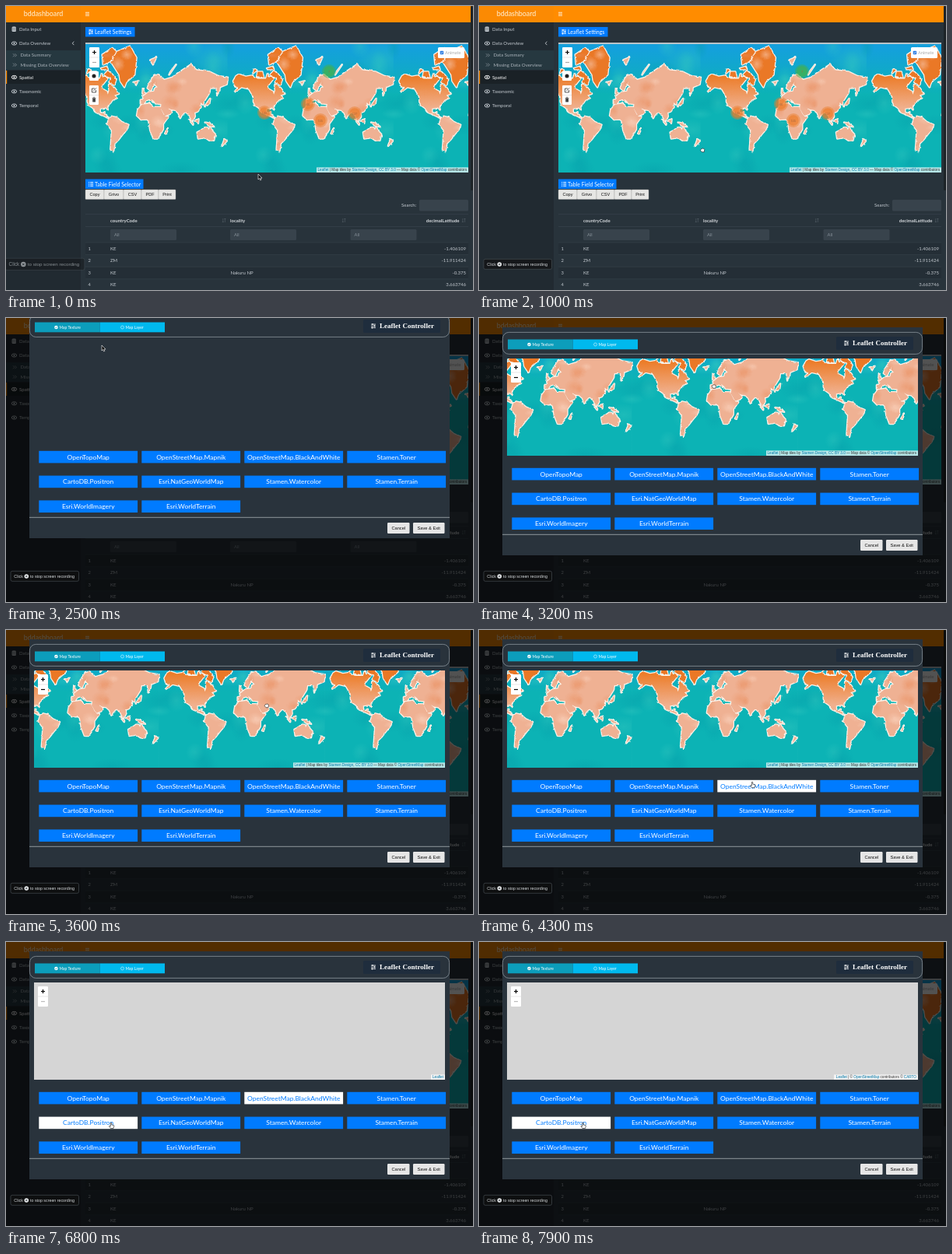
Animation of 600 by 365 pixels, one loop 8 s. Source, as an HTML page:

```html
<!DOCTYPE html>
<html lang="en">
<head>
<meta charset="utf-8">
<title>Map dashboard</title>
<style>
  html, body { margin: 0; width: 100%; height: 100%; overflow: hidden; background: #28333b; }
  svg { display: block; width: 600px; height: 365px; font-family: Lato, "Open Sans", sans-serif; }
  .ui { font-family: "Liberation Sans", sans-serif; }
  .link { fill: #0078a8; }
</style>
</head>
<body>
<svg id="stage" viewBox="0 0 600 365" xmlns="http://www.w3.org/2000/svg"></svg>
<script>
const LOOP = 8000, STEP = 100;
const WORLD = 213.3, DEG = WORLD / 360, RADIUS = WORLD / (2 * Math.PI);
const BLUE = '#007bff', ORANGE = '#ff8c00', PALE = '#c4cad0';

// ---------- drawing helpers ----------
const rect = (x, y, w, h, fill, more = '') =>
  `<rect x="${x}" y="${y}" width="${w}" height="${h}" fill="${fill}" ${more}/>`;
const circle = (x, y, r, fill, more = '') =>
  `<circle cx="${x}" cy="${y}" r="${r}" fill="${fill}" ${more}/>`;
const line = (d, color, width = 0.8) =>
  `<path d="${d}" fill="none" stroke="${color}" stroke-width="${width}"/>`;
const text = (x, y, s, size, fill, more = '') =>
  `<text x="${x}" y="${y}" font-size="${size}" fill="${fill}" ${more}>${s}</text>`;
const MID = 'text-anchor="middle"', END = 'text-anchor="end"', UI = 'class="ui"', BOLD = 'font-weight="bold"';

const listIcon = (x, y, color) =>
  line(`M${x} ${y - 2.2}h1.2m1 0h4M${x} ${y}h1.2m1 0h4M${x} ${y + 2.2}h1.2m1 0h4`, color, 1.1);
const sliderIcon = (x, y, color) =>
  line(`M${x} ${y - 2.2}h6M${x} ${y}h6M${x} ${y + 2.2}h6`, color, 0.8) +
  line(`M${x + 2} ${y - 3.2}v2M${x + 4.5} ${y - 1}v2M${x + 1.5} ${y + 1.2}v2`, color, 1.1);
const eyeIcon = (x, y, color) =>
  `<ellipse cx="${x}" cy="${y}" rx="3.2" ry="2.1" fill="none" stroke="${color}"/>` + circle(x, y, 1.1, color);

// ---------- world map ----------
const COASTS = {
  northAmerica: '-168 66,-162 70,-156 71.3,-141 69.6,-128 70.3,-115 68,-97 68,-94 71.5,-91 69,-85 69.5,-81 68,-87 65,-94 61,-94 58.5,-82 55,-80 51,-77 56,-78 62.5,-70 61,-65 59,-56 52,-66 50,-60 46,-70 43,-76 36,-81 31,-80 25.5,-83 30,-97 28,-97 20,-91 18.5,-87 21,-88 16,-83 15,-83 10,-78 8.5,-86 12,-95 16,-105 20,-112 29,-120 34,-124 40,-124 48,-134 58,-150 60,-158 57,-165 54.5,-158 59,-165 62',
  ellesmere: '-90 77,-92 81,-70 83,-62 82,-75 78.5',
  devon: '-95 75,-82 76,-80 74.5,-92 74.5',
  victoria: '-117 70,-115 73,-105 73,-102 69',
  banks: '-125 72,-122 74.5,-117 74',
  baffin: '-88 71,-80 73.5,-70 71,-62 67,-66 62.5,-77 65,-72 68',
  greenland: '-72 78,-60 82,-32 83.5,-18 80,-22 71,-40 65,-44 60,-53 66,-55 71',
  southAmerica: '-77 8,-72 12,-60 9,-50 0,-35 -6,-39 -16,-48 -26,-57 -36,-65 -42,-68 -54,-74 -51,-72 -30,-71 -18,-81 -5',
  africa: '-6 35,10 37,20 31,33 31,43 12,51 11,40 -4,40 -16,33 -27,27 -34,19 -34,12 -18,9 2,5 6,-8 5,-17 14,-15 25',
  eurasia: '-9 37,-9 43,-2 44,-4 48,8 54,20 55,23 59,28 60,22 63,24 66,18 61,13 56,6 59,10 64,20 70,30 71,42 67,60 69,72 72,100 77,112 74,140 73,160 70,180 69,178 63,163 60,162 56,157 51,156 59,142 59,140 53,128 40,127 35,121 39,122 31,115 22,108 20,109 12,104 2,99 9,94 17,88 22,80 14,77 8,73 19,66 25,57 26,50 30,58 23,55 17,44 13,35 28,36 36,27 37,24 37,20 41,13 45,17 40,9 44,3 42,-2 37',
  australia: '114 -22,122 -18,131 -12,136 -12,139 -17,142 -11,146 -19,153 -26,150 -37,140 -37,131 -32,116 -34',
  madagascar: '44 -24,50 -15,47 -25',
  newZealand: '173 -35,178 -38,168 -46',
  borneo: '109 2,117 6,116 -3',
  sumatra: '96 5,105 -3,105 -6',
  newGuinea: '131 -1,141 -3,150 -10,139 -8',
  japan: '130 32,140 36,142 45',
  britain: '-5 50,1 52,-4 58',
  iceland: '-23 65,-15 66,-18 63',
  svalbard: '12 79,25 80,18 77',
  novaya: '53 71,68 77,56 73'
};
const coastPath = coast => 'M' + coast.split(',').map(point => {
  const [lon, lat] = point.split(' ').map(Number);
  const y = -RADIUS * Math.asinh(Math.tan(lat * Math.PI / 180));
  return (lon * DEG).toFixed(1) + ' ' + y.toFixed(1);
}).join('L') + 'Z';

let seed = 11;
const random = () => (seed = seed * 16807 % 2147483647) / 2147483647;
const washes = (count, size, names) => Array.from({ length: count }, () => {
  const x = (random() - 0.5) * WORLD, y = (random() - 0.5) * 200;
  const rx = size * (0.4 + random()), ry = size * (0.3 + random() * 0.7);
  return `<ellipse cx="${x}" cy="${y}" rx="${rx}" ry="${ry}" fill="url(#${names[random() * names.length | 0]})"/>`;
}).join('');
const wash = (id, color, opacity) => `<radialGradient id="${id}"><stop stop-color="${color}" stop-opacity="${opacity}"/>
  <stop offset="1" stop-color="${color}" stop-opacity="0"/></radialGradient>`;
const ramp = (id, y1, y2, from, to) => `<linearGradient id="${id}" gradientUnits="userSpaceOnUse"
  x1="0" x2="0" y1="${y1}" y2="${y2}"><stop stop-color="${from}"/><stop offset="1" stop-color="${to}"/></linearGradient>`;

const ARCTIC = '#ea7828';
const landFill = { northAmerica: 'url(#americaFill)', greenland: ARCTIC, ellesmere: ARCTIC, devon: ARCTIC,
  victoria: ARCTIC, banks: ARCTIC, baffin: ARCTIC };
const coastPaths = Object.entries(COASTS).map(([name, coast]) => [name, coastPath(coast)]);
const allLand = coastPaths.map(([, d]) => d).join('');

const defs = `<defs>
  ${wash('deep', '#069faa', 0.4)}${wash('light', '#35c8c0', 0.4)}
  ${wash('rose', '#f9d0ba', 0.55)}${wash('rust', '#e98a58', 0.45)}
  ${ramp('seaFill', -95, -35, '#14a0dc', '#0cb3b5')}${ramp('americaFill', -58, -18, '#ec7d2a', '#f0b08e')}
  <filter id="rough"><feTurbulence type="fractalNoise" baseFrequency=".22" numOctaves="2" seed="3"/>
    <feDisplacementMap in="SourceGraphic" scale="2.6" xChannelSelector="R" yChannelSelector="G"/></filter>
  <clipPath id="landClip"><path d="${allLand}"/></clipPath>
  <clipPath id="pageMapClip"><rect x="102" y="49" width="492" height="165"/></clipPath>
  <clipPath id="modalMapClip"><rect x="36" y="52" width="528" height="125"/></clipPath>
  <g id="sea">${rect(-WORLD / 2 - 0.3, -110, WORLD + 0.6, 220, 'url(#seaFill)')}
    ${washes(30, 22, ['deep', 'light'])}</g>
  <g id="land" filter="url(#rough)"><path d="${allLand}" fill="none" stroke="#fbf1e8" stroke-width="2.6" stroke-linejoin="round"/>
    ${coastPaths.map(([name, d]) => `<path d="${d}" fill="${landFill[name] || '#efb193'}"/>`).join('')}
    <g clip-path="url(#landClip)">${washes(70, 11, ['rose', 'rust'])}</g></g>
</defs>`;

const worldMap = (x0, y0, clip) => `<g clip-path="url(#${clip})">` + ['sea', 'land'].map(id =>
  [-2, -1, 0, 1, 2].map(k => `<use href="#${id}" x="${x0 + k * WORLD}" y="${y0}"/>`).join('')).join('') + '</g>';

const zoomControl = (x, y, id, minusColor) =>
  rect(x, y, 13, 26, '#fff', 'rx="1.2"') + line(`M${x} ${y + 13}h13`, '#ccc', 0.5) +
  line(`M${x + 4} ${y + 6.5}h5m-2.5 -2.5v5`, '#000', 1.2) +
  `<path id="${id}" d="M${x + 4} ${y + 19.5}h5" stroke="${minusColor}" stroke-width="1.2"/>`;

const link = s => `<tspan class="link">${s}</tspan>`;
const OSM = link('OpenStreetMap');
const CREDITS = {
  tiles: `${link('Leaflet')} | Map tiles by ${link('Stamen Design')}, ${link('CC BY 3.0')} — Map data © ${OSM} contributors`,
  none: link('Leaflet'),
  carto: `${link('Leaflet')} | © ${OSM} contributors © ${link('CARTO')}`
};
const credit = (kind, right, bottom, width) =>
  rect(right - width, bottom - 6.6, width, 6.6, '#fff', 'fill-opacity=".7"') +
  text(right - 2, bottom - 1.7, CREDITS[kind], 4.67, '#333', `${UI} ${END}`);

// ---------- page ----------
function sidebar() {
  const item = (y, label, color = PALE) => eyeIcon(10.5, y, color) + text(17, y + 2.1, label, 6.1, color);
  const subItem = (y, label) =>
    line(`M9 ${y - 2}l2 2l-2 2m2.5 -4l2 2l-2 2`, '#a9b1b8', 0.6) + text(18.5, y + 2.1, label, 6.1, '#a9b1b8');
  return rect(0, 20, 96, 345, '#212a31') + rect(0, 57, 96, 25, '#263840') +
    rect(0, 83, 96, 17, '#1a2126') + rect(0, 83, 1.2, 17, ORANGE) +
    rect(7.5, 26.5, 5.5, 6.4, PALE, 'rx="1.5"') + line('M7.5 28.7h5.5m-5.5 2.1h5.5', '#212a31', 0.5) +
    text(17, 31.8, 'Data Input', 6.1, PALE) + item(48, 'Data Overview') +
    line('M87.3 45.7l-2 2.2l2 2.2', PALE, 0.9) +
    subItem(63.3, 'Data Summary') + subItem(75.6, 'Missing Data Overview') +
    item(91.5, 'Spatial', '#fff') + item(109.8, 'Taxonomic') + item(128, 'Temporal');
}

function pageMap() {
  const marker = (x, y, color, count) => circle(x, y, 9, color, 'fill-opacity=".45"') +
    circle(x, y, 6.8, color, 'fill-opacity=".6"') + text(x, y + 1.5, count, 4, '#a8663a', `${UI} ${MID}`);
  const tool = (y, h) => rect(107, y, 12, h, '#fff', 'rx="1.2"');
  return rect(102, 47, 492, 2, '#b9c3c8') + worldMap(391.5, 149, 'pageMapClip') +
    marker(332, 137, '#ec7c28', '142') + marker(388, 126, '#ec7c28', '86') + marker(404, 147, '#ec7c28', '515') +
    marker(448, 138, '#ec7c28', '127') + marker(415, 84, '#45b04a', '7') +
    zoomControl(107, 53, 'pageMinus', '#aaa') + tool(84, 12) + circle(113, 90, 2.5, '#222') +
    tool(102, 25) + line('M107 114.5h12', '#ccc', 0.5) +
    line('M114 106h-3.5v5h5v-3m-3 1l3.5 -3.7', '#333', 0.8) +
    line('M110.8 118.3h4.6m-3.1 -1h1.6', '#333', 0.8) + rect(111.2, 119, 3.8, 4.4, '#444') +
    rect(555, 53, 34, 14, '#fff', 'rx="1.5"') + rect(557.7, 57.7, 4.5, 4.5, '#2f7de1', 'rx=".8"') +
    line('M558.8 60l.9 1l1.5 -2.1', '#fff', 0.6) + text(564, 61.7, 'Animate', 5.6, '#aaa') +
    credit('tiles', 594, 214, 195);
}

function table() {
  const columns = [[134, 'countryCode', 280], [288, 'locality', 434]];
  const rows = [['KE', '', '-1.406109'], ['ZM', '', '-11.911424'], ['KE', 'Nakuru NP', '-0.375'], ['KE', '', '3.663746']];
  const sort = x => line(`M${x - 1.2} 273v5m-1 -1l1 1l1 -1M${x + 1.4} 278v-5m-1 1l1 -1l1 1`, '#5d6871', 0.5);
  const labels = [['Copy', 102, 24], ['Grivo', 126, 25], ['CSV', 151, 23], ['PDF', 174, 22], ['Print', 196, 22]];
  return labels.map(([s, x, w]) => rect(x, 236, w, 12.5, '#e6e6e4', 'stroke="#999" stroke-width=".4" rx=".8"') +
      text(x + w / 2, 244.2, s, 5.6, '#111', `${UI} ${MID}`)).join('') +
    text(508, 258.2, 'Search:', 6, PALE) + rect(531, 249, 63, 14.5, '#38434c', 'rx="1.5"') +
    line('M102 267.7h492M102 283.5h492', '#3b464f', 0.6) +
    columns.map(([x, s, arrow]) => text(x, 277.6, s, 6, '#d4d8dc', BOLD) + sort(arrow)).join('') +
    text(582.5, 277.6, 'decimalLatitude', 6, '#d4d8dc', `${BOLD} ${END}`) + sort(588) +
    [134, 288, 442.5].map(x => rect(x, 287, 85, 14, '#38434c', 'rx="1.5"') + text(x + 5, 296.2, 'All', 5.8, '#87929a')).join('') +
    rows.map(([code, place, lat], i) => {
      const y = 304 + i * 15.6;
      return (i % 2 ? '' : rect(102, y, 492, 15.6, '#242e36')) + line(`M102 ${y}h492`, '#3b464f', 0.5) +
        text(105.5, y + 9.6, i + 1, 5.8, PALE) + text(134, y + 9.6, code, 6, PALE) +
        text(288.5, y + 9.6, place, 6, PALE) + text(591, y + 9.6, lat, 6, PALE, END);
    }).join('');
}

const page = rect(0, 0, 600, 365, '#28333b') + sidebar() +
  rect(0, 0, 600, 21, ORANGE) + rect(0, 0, 96, 21, '#fb8a03') +
  text(48, 13.3, 'bddashboard', 8.9, '#fff3dc', MID) +
  line('M102 8.3h5m-5 2h5m-5 2h5', '#fff', 0.8) +
  `<g id="settings" color="#fff">${rect(102, 27, 63.5, 12.5, BLUE, 'id="settingsBox"')}
    ${sliderIcon(106, 33.2, 'currentColor')}${text(114, 35.8, 'Leaflet Settings', 7.05, 'currentColor')}</g>` +
  pageMap() + rect(102, 222.5, 74.5, 12.5, BLUE) + listIcon(106, 229, '#fff') +
  text(114, 231.5, 'Table Field Selector', 6.95, '#fff') + table() +
  rect(597, 0, 3, 237, '#1d2327', 'rx="1"');

// ---------- dialog ----------
const PROVIDERS = ['OpenTopoMap', 'OpenStreetMap.Mapnik', 'OpenStreetMap.BlackAndWhite', 'Stamen.Toner',
  'CartoDB.Positron', 'Esri.NatGeoWorldMap', 'Stamen.Watercolor', 'Stamen.Terrain',
  'Esri.WorldImagery', 'Esri.WorldTerrain'];
const BLACK_AND_WHITE = 2, POSITRON = 4;
const providerBox = i => ({ x: 42.3 + i % 4 * 132, y: 192.8 + (i >> 2) * 31.8, w: 126.8, h: 15.6 });
const providers = PROVIDERS.map((name, i) => {
  const { x, y, w, h } = providerBox(i);
  return `<g class="provider" color="#fff">${rect(x, y, w, h, BLUE)}
    ${text(x + w / 2, y + 10.7, name, 8.46, 'currentColor', MID)}</g>`;
}).join('');
const footButton = (x, w, s) => rect(x, 285, w, 14, '#e6e6e6', 'rx="1.2"') +
  text(x + w / 2, 294, s, 5.7, '#111', `${UI} ${MID}`);

const dialog = rect(30, 12, 540, 293, '#29333c') +
  rect(30.4, 18.4, 539.2, 28, 'none', 'rx="8" stroke="#8b959c" stroke-width=".8"') +
  rect(37, 27.5, 83.5, 12.8, '#0c9dbb') + rect(120.5, 27.5, 83.5, 12.8, '#00b9ee') +
  circle(64.5, 34, 2.3, '#fff') + line('M63.3 34l.9 1l1.6 -2', '#0c9dbb', 0.6) +
  text(68.5, 35.8, 'Map Texture', 5, '#fff') +
  circle(149.5, 34, 2, 'none', 'stroke="#fff" stroke-width=".5"') + text(153.5, 35.8, 'Map Layer', 5, '#fff') +
  rect(459, 24, 99, 17, '#1f2d3d', 'rx="1.5"') + sliderIcon(469, 32.3, '#fff') +
  text(480, 35.4, 'Leaflet Controller', 9.05, '#fff', `${BOLD} font-family="Liberation Serif, serif"`) +
  `<g id="preview">${rect(36, 52, 528, 125, '#d5d5d5')}
    <g id="tiles">${worldMap(303, 114.5, 'modalMapClip')}</g>${zoomControl(41, 57, 'minus', '#000')}
    <g id="creditTiles">${credit('tiles', 564, 177, 195)}</g>
    <g id="creditNone">${credit('none', 564, 177, 18)}</g>
    <g id="creditCarto">${credit('carto', 564, 177, 108)}</g></g>` +
  providers + line('M30 278.3h540', '#a9b0b5', 0.8) +
  footButton(490, 28.5, 'Cancel') + footButton(523, 40.5, 'Save &amp; Exit');

// ---------- overlay ----------
const toast = rect(6, 325.3, 87.5, 13, '#111', 'fill-opacity=".7" rx="2" stroke="#4d565c" stroke-width=".6"') +
  text(10.3, 333.9, 'Click', 5.4, '#d8dcdf', UI) + circle(26.3, 332, 2.8, '#e8eaec') +
  line('M25.2 330.9l2.2 2.2m0 -2.2l-2.2 2.2', '#171d21', 0.7) +
  text(31, 333.9, 'to stop screen recording', 5.3, '#d8dcdf', UI);
const outline = 'stroke-width=".6" stroke-linejoin="round"';
const cursors =
  `<path id="arrow" d="M0 0V7L1.6 5.6L2.7 8L3.9 7.4L2.8 5.1H5Z" fill="#111" stroke="#fff" ${outline}/>
   <path id="hand" d="M-.7 .4Q0 -.5 .7 .4V3L3.6 3.6Q4 4.5 3.5 6L3 7.5H-.6L-2.6 4.7Q-2.2 3.8 -.7 5Z" fill="#fff" stroke="#111" ${outline}/>
   <path id="grab" d="M-2 1Q-1.4 -.2 -.6 .5Q.4 -.5 1 .5Q2 0 2.4 1.4L2 4.7H-1L-2.8 2.6Z" fill="#fff" stroke="#111" ${outline}/>`;

const stage = document.getElementById('stage');
stage.innerHTML = defs + page + rect(0, 0, 600, 365, '#000', 'id="dim"') + `<g id="dialog">${dialog}</g>
  <g id="toast">${toast}</g><g id="cursor">${cursors}</g>`;

// ---------- motion ----------
const $ = id => document.getElementById(id);
const show = (id, on) => $(id).style.display = on ? '' : 'none';
const clamp = v => Math.max(0, Math.min(1, v));
const inside = (p, b) => p.x >= b.x && p.x <= b.x + b.w && p.y >= b.y && p.y <= b.y + b.h;
const providerNodes = [...document.querySelectorAll('.provider')];
const SETTINGS = { x: 102, y: 27, w: 64, h: 13 };
const PAGE_MAP = { x: 102, y: 49, w: 492, h: 165 };
const PREVIEW = { x: 36, y: 52, w: 528, h: 125 };
const OPEN = 2500, PREVIEW_SHOWN = 2700, TILES_SHOWN = 2900, FIRST_PICK = 4600, SECOND_PICK = 7400;

// time, x, y of the pointer tip
const PATH = [[0, 324, 216], [700, 324, 216], [1800, 123, 35], [2600, 123, 35], [3400, 335, 95], [3700, 335, 95],
  [4400, 352, 201], [5500, 352, 201], [6500, 135, 232], [7400, 135, 232], [7700, 133.5, 232], [LOOP, 133.5, 232]];
function pointerAt(t) {
  const i = PATH.findIndex(p => p[0] > t);
  const [t0, x0, y0] = PATH[i - 1], [t1, x1, y1] = PATH[i];
  const u = (t - t0) / (t1 - t0), e = u * u * (3 - 2 * u);
  return { x: x0 + (x1 - x0) * e, y: y0 + (y1 - y0) * e };
}
function paintButton(box, group, lit) {
  box.setAttribute('fill', lit ? '#fff' : BLUE);
  group.setAttribute('color', lit ? BLUE : '#fff');
}

function render(t) {
  const pointer = pointerAt(t), open = t >= OPEN;
  const settled = clamp((t - 100) / 400), scale = 1.17 - 0.17 * settled;
  $('toast').setAttribute('transform', `translate(49.7 331.8) scale(${scale}) translate(-49.7 -331.8)`);
  $('toast').setAttribute('opacity', 0.55 + 0.45 * settled);

  const onSettings = !open && inside(pointer, SETTINGS);
  paintButton($('settingsBox'), $('settings'), onSettings);

  $('dim').setAttribute('opacity', 0.68 * clamp((t - 2300) / 200));
  show('dialog', open);
  const drop = t < 2900 ? -22 * Math.exp((OPEN - t) / 100) : 0;
  $('dialog').setAttribute('transform', `translate(0 ${drop})`);

  const tiled = t >= TILES_SHOWN && t < FIRST_PICK, carto = t >= SECOND_PICK;
  show('preview', t >= PREVIEW_SHOWN);
  show('tiles', tiled);
  show('creditTiles', tiled);
  show('creditNone', !tiled && !carto);
  show('creditCarto', carto);
  $('minus').setAttribute('stroke', tiled ? '#000' : '#bbb');

  const focus = carto ? POSITRON : t >= FIRST_PICK ? BLACK_AND_WHITE : -1;
  let onProvider = false;
  providerNodes.forEach((node, i) => {
    const hover = open && inside(pointer, providerBox(i));
    onProvider = onProvider || hover;
    paintButton(node.firstElementChild, node, hover || i === focus);
  });

  const onMap = open ? t >= PREVIEW_SHOWN && inside(pointer, PREVIEW) : inside(pointer, PAGE_MAP);
  const kind = onSettings || onProvider ? 'hand' : onMap ? 'grab' : 'arrow';
  ['arrow', 'hand', 'grab'].forEach(id => show(id, id === kind));
  $('cursor').setAttribute('transform', `translate(${pointer.x} ${pointer.y})`);
}

let shown = -1;
function tick() {
  const t = Math.floor(performance.now() % LOOP / STEP) * STEP;
  if (t !== shown) render(shown = t);
  requestAnimationFrame(tick);
}
tick();
</script>
</body>
</html>
```
